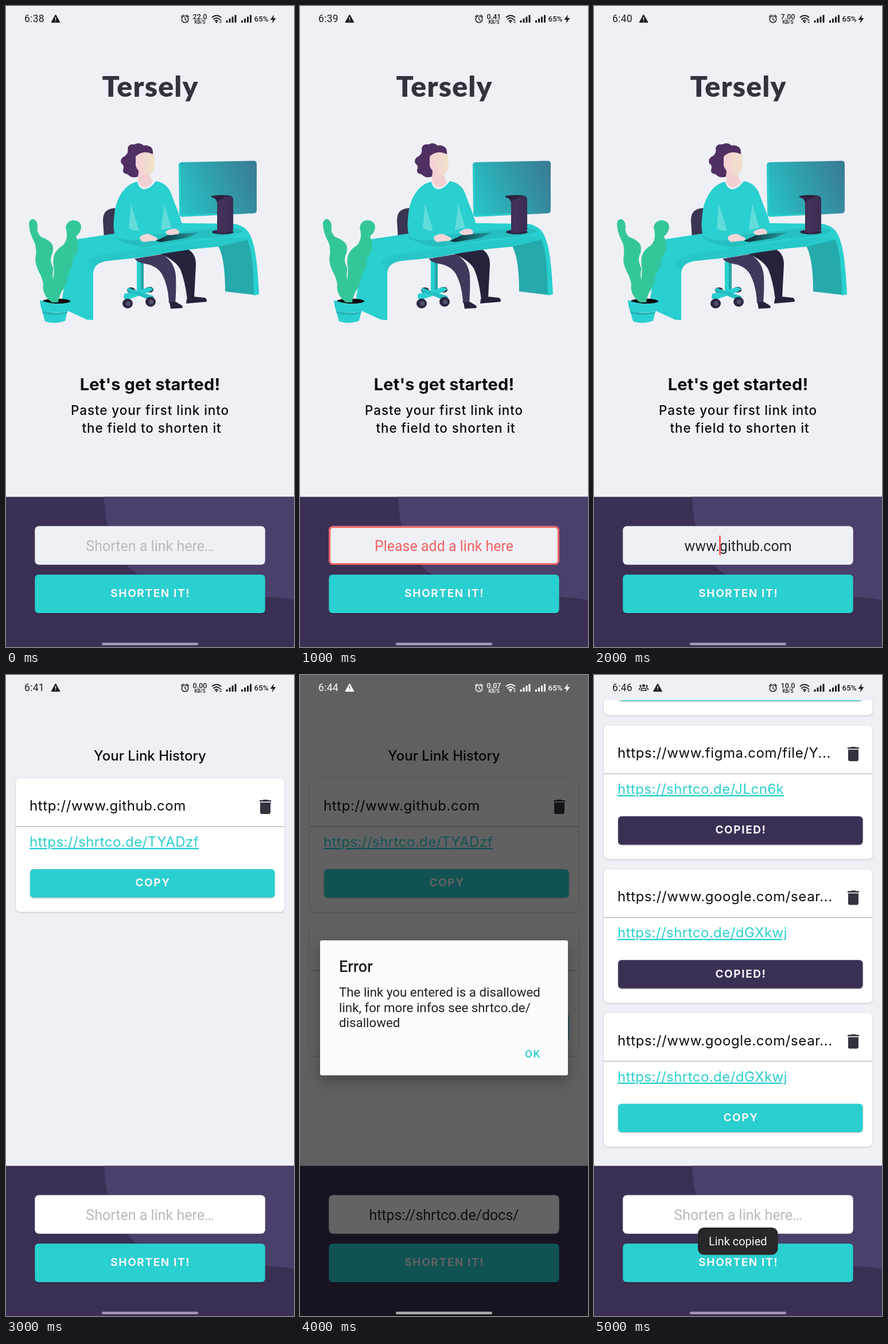
Recreate the animation shown at these times as an HTML page. Size 502 by 1116 pixels, loop 6000 ms.

```html
<!DOCTYPE html>
<html lang="en">
<head>
<meta charset="utf-8">
<title>Link shortener</title>
<style>
  html, body { margin: 0; width: 100%; height: 100%; overflow: hidden; background: #eff0f6; }
  svg { display: block; width: 100vw; height: 100vh; }
  text { font-family: Inter, "Open Sans", sans-serif; }
  .rob { font-family: Roboto, Arial, sans-serif; }
  .logo { font-family: Lato, sans-serif; }
  .card { filter: drop-shadow(0 1px 1.5px #0003); }
  .btn { filter: drop-shadow(0 1.5px 1px #0004); }
  .dialog { filter: drop-shadow(0 10px 12px #0004); }
</style>
</head>
<body>
<svg id="stage" viewBox="0 0 502 1116" xmlns="http://www.w3.org/2000/svg"></svg>
<script>
const TEAL = '#2acfcf', BG = '#eff0f6', PURPLE = '#3b3054', INK = '#35323e', RED = '#f46262';
const MID = 251;

const text = (s, x, y, size, { w = 400, fill = '#0b0a10', ls = 0, mid, cls = '', more = '' } = {}) =>
  `<text x="${mid ? x + ls / 2 : x}" y="${y}" font-size="${size}" font-weight="${w}" fill="${fill}"
    letter-spacing="${ls}" class="${cls}" ${mid ? 'text-anchor="middle"' : ''} ${more}>${s}</text>`;
const path = (d, fill, more = '') => `<path d="${d}" fill="${fill}" ${more}/>`;
const rect = (x, y, w, h, r, fill, more = '') =>
  `<rect x="${x}" y="${y}" width="${w}" height="${h}" rx="${r}" fill="${fill}" ${more}/>`;
const dot = (x, y, rx, ry, fill) => `<ellipse cx="${x}" cy="${y}" rx="${rx}" ry="${ry}" fill="${fill}"/>`;
const line = (d, color, width) =>
  `<path d="${d}" fill="none" stroke="${color}" stroke-width="${width}" stroke-linecap="round" stroke-linejoin="round"/>`;

const button = (label, x, y, w, h, fill) =>
  rect(x, y, w, h, 6, fill, 'class="btn"') +
  text(label, x + w / 2, y + h / 2 + 5.5, 19, { w: 750, fill: '#f3f5fa', ls: 1.6, mid: true });

const defs = `<defs>
  <linearGradient id="screen" gradientUnits="userSpaceOnUse" x1="304" y1="345" x2="436" y2="290">
    <stop stop-color="#27c3c6"/><stop offset=".5" stop-color="#309fab"/><stop offset="1" stop-color="#397d96"/>
  </linearGradient>
  <linearGradient id="skin"><stop stop-color="#f5cfd7"/><stop offset="1" stop-color="#efe2c8"/></linearGradient>
  <linearGradient id="keys"><stop stop-color="#10252f"/><stop offset="1" stop-color="#23a5a9"/></linearGradient>
  <linearGradient id="stand"><stop stop-color="#32264a"/><stop offset=".4" stop-color="#433159"/><stop offset="1" stop-color="#3b2c53"/></linearGradient>
  <pattern id="grain" width="5" height="5" patternUnits="userSpaceOnUse" patternTransform="rotate(27)">
    <circle cx="1" cy="1" r=".7" fill="#80759a"/><circle cx="3.4" cy="3" r=".6" fill="#6a5f86"/>
  </pattern>
</defs>`;

function plant() {
  return dot(88, 514, 24, 4.5, '#050509') +
    path('M40 378Q42 370 48 371Q55 374 55 384Q53 394 61 402Q76 407 81 416Q84 426 79 435Q76 446 83 457Q79 470 84 482Q89 500 88 514L80 516Q62 503 65 484Q63 473 57 462Q49 446 52 434Q54 418 47 406Q40 392 40 378Z', '#34c69b') +
    path('M104 385Q107 373 118 373Q131 374 131 386Q130 395 122 401Q128 414 125 425Q122 435 116 440Q118 452 112 460Q106 468 106 479Q103 490 97 497Q92 507 91 516L80 516Q78 499 82 481L84 458Q80 442 85 431Q91 421 99 417Q110 406 104 385Z', '#34c69b') +
    path('M59 512Q72 517 86 518Q101 519 113 515Q112 527 107 532Q84 536 63 531Q60 524 59 512Z', TEAL) +
    path('M63 531Q84 537 107 532L103 548Q85 555 68 549Z', TEAL) +
    path('M63 531Q84 537 107 532L106 535Q85 540 64 535Z', '#23b2b5');
}

function chairAndLegs() {
  const leg = 'M224 440L272 432Q294 445 296 470Q297 494 295 517H284Q283 488 272 467Q264 453 244 449Q230 447 224 440Z';
  const back = 'M189 352Q169 353 169 373L171 405L197 402V352Z';
  return path(back, '#37324d') + path(back, 'url(#grain)', 'opacity=".55"') +
    rect(228, 440, 12, 58, 0, TEAL) + rect(235, 440, 5, 55, 0, '#23a6a9') +
    dot(218, 495, 7, 5, '#242039') + dot(250, 494, 7, 5, '#242039') +
    path('M206 501L229 496L250 489L257 493L250 498L213 511L205 509Z', TEAL) +
    path('M213 490L231 497L257 505V512L250 512L229 503L211 497Z', '#25bfc2') +
    dot(212, 518, 9, 8.5, '#2b2743') + dot(213, 518, 4, 4, '#555069') +
    dot(252, 515, 9, 8.5, '#2b2743') + dot(253, 515, 4, 4, '#555069') +
    path('M268 431L318 424Q331 432 331 450L328 508L316 511Q312 478 304 459Q296 443 268 431Z', '#25233b') +
    path('M315 510L328 506L347 508Q352 512 349 515L314 518Z', '#25233b') +
    path(leg, '#3c3457') + path(leg, 'url(#grain)', 'opacity=".8"') +
    path('M285 516L296 515L306 521Q310 525 306 526L287 527Z', '#25233b');
}

function desk() {
  return path('M370 418L421 406Q432 430 433 503L382 497Q382 440 370 418Z', '#25a9ab') +
    path('M131 405L190 396L301 378L386 379Q402 377 415 386C431 396 438 432 441 502L432 504Q431 425 420 407L370 419Q305 424 242 437L175 444Q152 448 152 466V547L141 546L95 525L114 416Q118 406 131 405Z', TEAL) +
    path('M141 444Q150 436 175 431L360 406Q405 399 420 407L370 419Q305 424 242 437L175 444Q155 447 152 463Q144 455 141 444Z', '#22bec1', 'opacity=".45"') +
    path('M150 442L245 423L262 432L242 437L175 444Q158 447 152 460Z', 'url(#grain)', 'opacity=".22"') +
    path('M187 402Q212 396 240 400L385 385Q410 387 414 393Q375 405 338 404Q280 414 240 420Q208 416 187 402Z', '#22afb2', 'opacity=".5"');
}

function person() {
  return path('M231 280L230 305Q239 326 256 307L248 288Z', '#f2d0d2') +
    path('M229 306C209 309 195 330 190 354C186 382 186 400 196 404Q215 410 234 407L242 398L279 393Q302 393 307 384C306 370 297 352 290 332Q283 308 261 305Q250 320 239 319Q231 316 229 306Z', TEAL) +
    path('M218 345L232 391Q222 392 214 387Z', '#62dcdb') +
    path('M276 345L288 386L270 390Z', '#62dcdb') +
    path('M261 409L284 398L337 394L314 404L270 411Z', 'url(#keys)') +
    path('M233 402Q241 396 250 397L264 404Q264 410 254 409L240 411Q233 409 233 402Z', '#f3d5d8') +
    path('M278 393Q286 387 296 388Q304 391 301 397L286 399Q278 398 278 393Z', '#f3d5d8') +
    path('M256 259Q257 250 253 246Q246 241 240 243Q232 236 224 241Q214 239 212 248Q214 257 206 262Q198 266 201 274Q207 278 204 285Q203 292 212 293Q219 301 230 297L232 281L229 263Z', '#502f63') +
    path('M226 262Q239 249 258 259Q261 279 255 290Q251 296 242 293Q229 289 226 278Z', 'url(#skin)');
}

function computer() {
  return path('M306 272L432 269.5Q437 269.5 437 275V355Q437 361 431 361L307 367Q302 367 302 361L301 278Q301 272 306 272Z', 'url(#screen)') +
    line('M303 277L304 362Q304 365 308 365L370 362', '#2acfcf', 2.5);
}

function monitorStand() {
  return dot(378, 393.5, 19, 4, '#2d2241') +
    path('M358 331Q370 328 390 330Q397 332 396 338V390Q385 397 368 394V343Q367 334 358 333Z', 'url(#stand)') +
    path('M358 331Q370 328 390 330Q380 333 368 341Q366 334 358 333Z', '#2d2241');
}

const welcome = () =>
  text('Tersely', MID, 158, 50, { w: 900, fill: INK, ls: 1.2, mid: true, cls: 'logo' }) +
  computer() + chairAndLegs() + desk() + person() + monitorStand() + plant() +
  text("Let's get started!", MID, 669, 29, { w: 700, ls: .15, mid: true }) +
  text('Paste your first link into', 113, 712, 22.5, { w: 450, ls: .9 }) +
  text('the field to shorten it', 132.5, 743, 22.5, { w: 450, ls: .9 });

const trash = y =>
  path(`M443 ${y + 5}H461V${y + 22}Q461 ${y + 25} 458 ${y + 25}H446Q443 ${y + 25} 443 ${y + 22}ZM442 ${y + 1}H447L449 ${y}H455L457 ${y + 1}H462V${y + 3.5}H442Z`, INK);

function card(y, url, code, copied, fill = '#fff') {
  return rect(17, y, 468.5, 232.5, 8, fill, 'class="card"') +
    text(url, 41, y + 56, 24, { ls: .6 }) + trash(y + 37) +
    rect(17, y + 83.3, 468.5, 1.4, 0, '#b9b9bd') +
    text('https://shrtco.de/' + code, 41, y + 119, 24,
      { fill: TEAL, ls: .45, more: 'text-decoration="underline"' }) +
    button(copied ? 'COPIED!' : 'COPY', 42, y + 158, 426.5, 49.5, copied ? PURPLE : TEAL);
}

const history = fill =>
  text('Your Link History', MID, 149, 24, { w: 500, mid: true }) +
  card(180, 'http://www.github.com', 'TYADzf', false, fill);

function panel({ value, hint, error, fill = BG, plain }) {
  const color = error ? RED : hint ? '#b9b9bd' : '#26252c';
  return rect(0, 854.6, 502, 262, 0, PURPLE) +
    (plain ? '' : path('M171 854.6C172 900 186 964 232 991C300 1040 425 1020 502 1034V854.6Z', '#4b3f6b')) +
    rect(50.3, 905.5, 401.4, 67.3, 7, fill) +
    (error ? rect(51.6, 907, 398.8, 64.6, 6, 'none', `stroke="${RED}" stroke-width="3"`) : '') +
    text(value, MID, 949, 25, { fill: color, mid: true, cls: 'rob' }) +
    button('SHORTEN IT!', 50.3, 990, 401.4, 67, TEAL);
}

function bars(x, c) {
  return [0, 1, 2, 3].map(i => rect(x + 5 * i, 25 - 3.2 * i, 3, 4 + 3.2 * i, .8, c)).join('');
}

function statusBar(time, speed, { c = '#1c1c20', group } = {}) {
  const wx = group ? 111 : 86.5;
  const people = group ? line('M82 27Q82 23 86.5 23T91 27ZM79 26Q78 23 82 22M94 26Q95 23 91 22', c, 1.5) +
    [[86.5, 18.5, 2.4], [81, 19, 1.7], [92, 19, 1.7]].map(([x, y, r]) => dot(x, y, r, r, c)).join('') : '';
  const hole = c === '#fff' ? '#606062' : BG;
  return text(time, 32, 28, 17.5, { fill: c, ls: .3, cls: 'rob' }) + people +
    path(`M${wx} 15L${wx + 7.5} 28.5H${wx - 7.5}Z`, c, `stroke="${c}" stroke-linejoin="round"`) +
    line(`M${wx} 20V23.5M${wx} 26V26.2`, hole, 1.6) +
    `<circle cx="312" cy="23" r="5.8" fill="none" stroke="${c}" stroke-width="1.5"/>` +
    line('M312 20V23.5L314.5 25M305.5 18.5L309 15.5M318.5 18.5L315 15.5', c, 1.4) +
    text(speed, 338, 23, 12.5, { w: 500, fill: c, mid: true, cls: 'rob' }) +
    text('KB/S', 338, 31, 8.5, { w: 500, fill: c, mid: true, cls: 'rob' }) +
    line('M359.5 19.5Q367 13.5 374.5 19.5M362 23Q367 18.5 372 23M364.5 26Q367 24 369 26', c, 2) +
    dot(366.8, 28, 1.5, 1.5, c) + path('M372 25.5L374 23L376 25.5ZM372 27.5H376L374 30Z', c) +
    bars(383.5, c) + bars(410, c) +
    text('65%', 432.5, 27, 13.5, { w: 500, fill: c, cls: 'rob' }) +
    path('M467 15L460.5 24H465L463.5 30.5L470.5 21H466Z', c);
}

const homeBar = (c = '#a598b6') => rect(167, 1108.5, 168, 4.5, 2.2, c);
const say = (s, x, y, size, more) => text(s, x, y, size, { fill: '#212124', cls: 'rob', ...more });

const dialog = () =>
  rect(0, 0, 502, 1116, 0, '#000', 'opacity=".6"') +
  rect(35, 462, 432, 235, 3, '#fcfcfc', 'class="dialog"') +
  say('Error', 68, 517, 27, { w: 500 }) +
  ['The link you entered is a disallowed', 'link, for more infos see shrtco.de/', 'disallowed']
    .map((s, i) => say(s, 68, 560 + 26.5 * i, 22.3)).join('') +
  say('OK', 392, 666, 18.8, { w: 500, fill: TEAL, ls: 1.6 });

const toast = () =>
  rect(181, 962, 139.5, 47.5, 11, '#28282a') +
  say('Link copied', 250.8, 993, 20, { fill: '#f8f8f8', mid: true });

const HINT = { value: 'Shorten a link here…', hint: true };
const search = 'https://www.google.com/sear...';
const dimCard = '#f3f3f5';

const scenes = [
  () => welcome() + panel(HINT) + statusBar('6:38', '22.0') + homeBar(),
  () => welcome() + panel({ value: 'Please add a link here', error: true }) + statusBar('6:39', '0.41') + homeBar(),
  () => welcome() + panel({ value: 'www.github.com' }) + rect(218, 922, 3, 34, 0, RED) +
    statusBar('6:40', '7.00') + homeBar(),
  () => history() + panel({ ...HINT, fill: '#fff' }) + statusBar('6:41', '0.00') + homeBar(),
  () => history(dimCard) + card(430.3, '', '', false, dimCard) +
    panel({ value: 'https://shrtco.de/docs/', plain: true, fill: '#f8f9fd' }) +
    dialog() + statusBar('6:44', '0.07', { c: '#fff' }) + homeBar('#ababaf'),
  () => card(-162.3, '', '', false) +
    card(88, 'https://www.figma.com/file/Y...', 'JLcn6k', true) +
    card(338.3, search, 'dGXkwj', true) + card(588.5, search, 'dGXkwj', false) +
    rect(0, 0, 502, 44, 0, BG) + panel({ ...HINT, fill: '#fff' }) + toast() +
    statusBar('6:46', '10.0', { group: true }) + homeBar()
];

const stage = document.getElementById('stage');
const start = performance.now();
let shown = -1;

function tick() {
  const i = Math.floor((performance.now() - start) / 1000) % scenes.length;
  if (i !== shown) {
    stage.innerHTML = defs + rect(0, 0, 502, 1116, 0, BG) + scenes[i]();
    shown = i;
  }
  requestAnimationFrame(tick);
}
tick();
</script>
</body>
</html>
```
